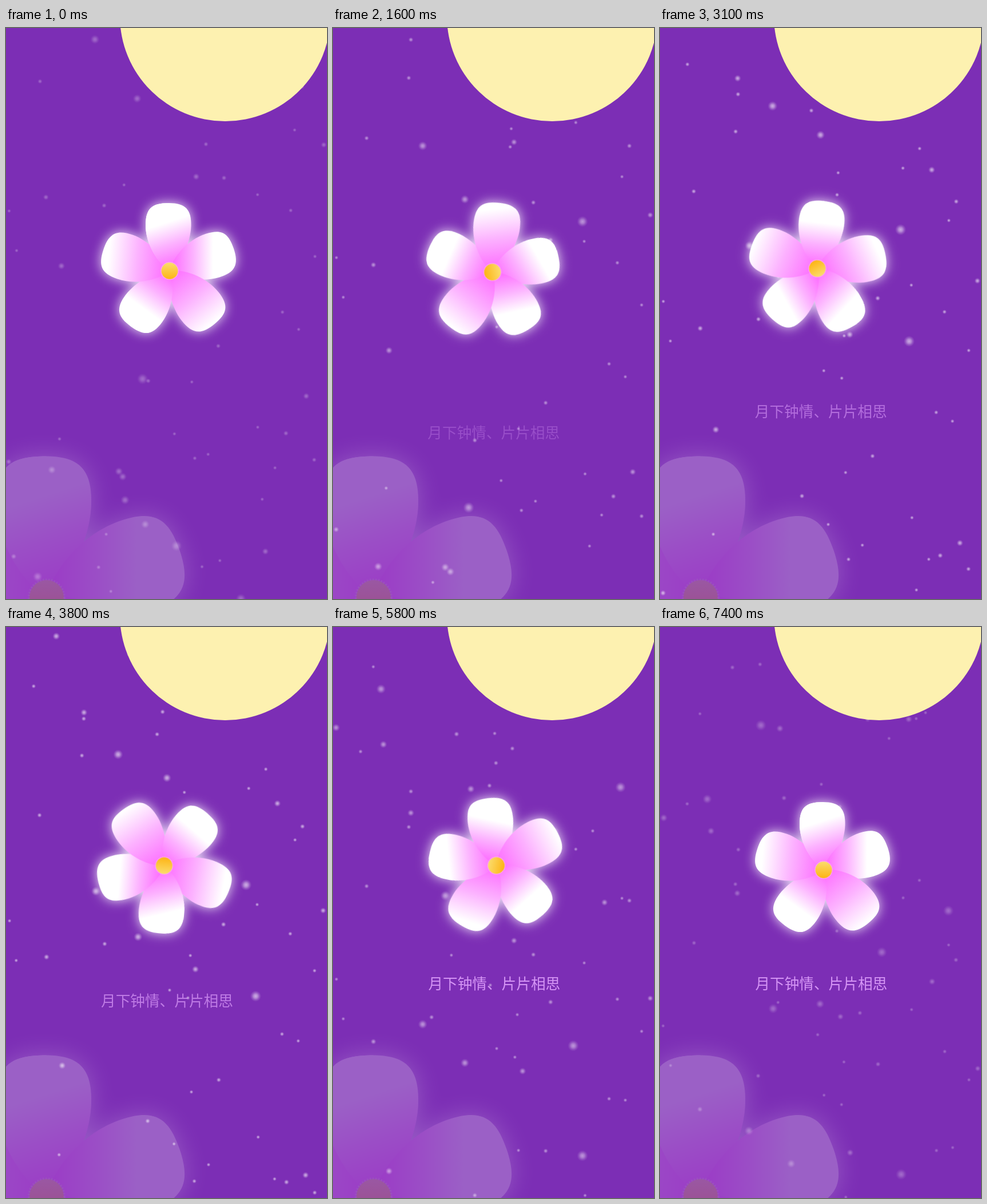
Recreate the animation shown at these times as an HTML page with a canvas. Size 561 by 998 pixels, loop 7.5 s.

```html
<!DOCTYPE html>
<html lang="zh">
<head>
<meta charset="utf-8">
<title>Falling light</title>
<style>
  html, body { margin: 0; width: 100%; height: 100%; overflow: hidden; background: #7c2eb5; }
  svg, canvas { position: absolute; left: 0; top: 0; width: 100%; height: 100%; display: block; }
  .spin { transform-origin: 281px 421px; animation: spin 7.5s steps(75, jump-none) infinite; }
  .line { font: 300 25.65px "Noto Sans CJK SC", "Noto Sans CJK", sans-serif; fill: #d595f5; animation: rise 7.5s infinite; }
  @keyframes spin { from { transform: rotate(0deg); } to { transform: rotate(360deg); } }
  @keyframes rise {
    0% { transform: translate(-1.5px, 123px); opacity: 0; animation-timing-function: steps(50, end); }
    66.6667%, 100% { transform: none; opacity: 1; }
  }
</style>
</head>
<body>
<svg viewBox="0 0 561 998">
  <defs>
    <path id="petal" d="M0 0C-20-12-42-45-42-80C-42-110-30-118-3-118.5C27-119 38-108 37.5-79C37-50 20-15 0 0Z"/>
    <clipPath id="half"><rect x="-60" y="-130" width="60" height="130"/></clipPath>
    <linearGradient id="core" x2="0" y2="1">
      <stop stop-color="#fbdc6c"/><stop offset="1" stop-color="#fdb414"/>
    </linearGradient>
    <filter id="glow" filterUnits="userSpaceOnUse" x="-160" y="-160" width="320" height="320" color-interpolation-filters="sRGB">
      <feDropShadow dx="0" dy="0" stdDeviation="10" flood-color="#fff" flood-opacity=".85"/>
    </filter>
    <g id="flower">
      <g id="petals" filter="url(#glow)"></g>
      <circle r="14.5" fill="url(#core)"/>
      <circle r="15" fill="none" stroke="#fbc6d8" stroke-width="1.5" stroke-dasharray="1.2 1.2"/>
    </g>
  </defs>
  <use href="#flower" transform="translate(71 995) scale(2.08)" opacity=".24"/>
</svg>
<canvas width="561" height="998"></canvas>
<svg viewBox="0 0 561 998">
  <circle cx="383" cy="-21" r="184" fill="#fdf1b0"/>
  <g class="spin"><use href="#flower" transform="translate(286 424.5)"/></g>
  <text class="line" x="166.4" y="633">月下钟情、片片相思</text>
</svg>
<script>
  const petals = [
    { turn: 0, size: 1, reach: 82, tilt: -18 },
    { turn: 72, size: 1, reach: 76, tilt: 18 },
    { turn: 141, size: 1.025, reach: 116, tilt: 0 },
    { turn: 216, size: 1, reach: 80, tilt: 0 },
    { turn: 289, size: 1.025, reach: 106, tilt: -14 }
  ];

  const shape = ({ turn, size }, i, extra = '') =>
    `<use href="#petal" transform="rotate(${turn}) scale(${size})" fill="url(#pink${i})" ${extra}/>`;

  const fade = ({ reach, tilt }, i) =>
    `<linearGradient id="pink${i}" gradientUnits="userSpaceOnUse" x1="0" y1="-6" x2="0" y2="${-reach}" gradientTransform="rotate(${tilt})">
      <stop stop-color="#fd70ff"/><stop offset=".5" stop-color="#fcb2ff"/><stop offset="1" stop-color="#fff"/>
    </linearGradient>`;

  // The first petal also covers the last one, so its left half is drawn again on top.
  document.getElementById('petals').innerHTML =
    petals.map(fade).join('') +
    petals.map((p, i) => shape(p, i)).join('') +
    shape(petals[0], 0, 'clip-path="url(#half)"');

  let seed = 11;
  const rnd = () => (seed = seed * 16807 % 2147483647) / 2147483647;
  rnd();

  // Mostly small slow dots; the larger ones fall faster. Some start above the stage.
  const dots = Array.from({ length: 95 }, (_, i) => {
    const v = 51 + 90 * rnd() ** 2.8;
    const top = -7.4 * v;
    return { x: 561 * rnd(), y: top + (998 - top) * rnd(), v, side: i % 2 ? 1 : -1 };
  });

  const ctx = document.querySelector('canvas').getContext('2d');
  const light = ctx.createRadialGradient(0, 0, 0, 0, 0, 1);
  [[0, .75], [.35, .55], [.7, .2], [1, 0]].forEach(([at, a]) =>
    light.addColorStop(at, `rgba(255,255,255,${a})`));

  function draw(ms) {
    const frame = Math.floor(ms % 7500 / 100);
    const p = frame / 74;
    const sway = (1 - Math.cos(6 * Math.PI * p)) / 140;
    ctx.setTransform(1, 0, 0, 1, 0, 0);
    ctx.clearRect(0, 0, 561, 998);
    ctx.fillStyle = light;
    ctx.globalAlpha = .4 + .42 * Math.sin(Math.PI * p);
    for (const { x, y, v, side } of dots) {
      const r = v / 14.5;
      ctx.setTransform(r, 0, 0, r, x + side * sway * v, y + v * frame / 10);
      ctx.fillRect(-1, -1, 2, 2);
    }
  }

  let start;
  function tick(now) {
    start ??= now;
    draw(now - start);
    requestAnimationFrame(tick);
  }
  requestAnimationFrame(tick);
</script>
</body>
</html>
```
